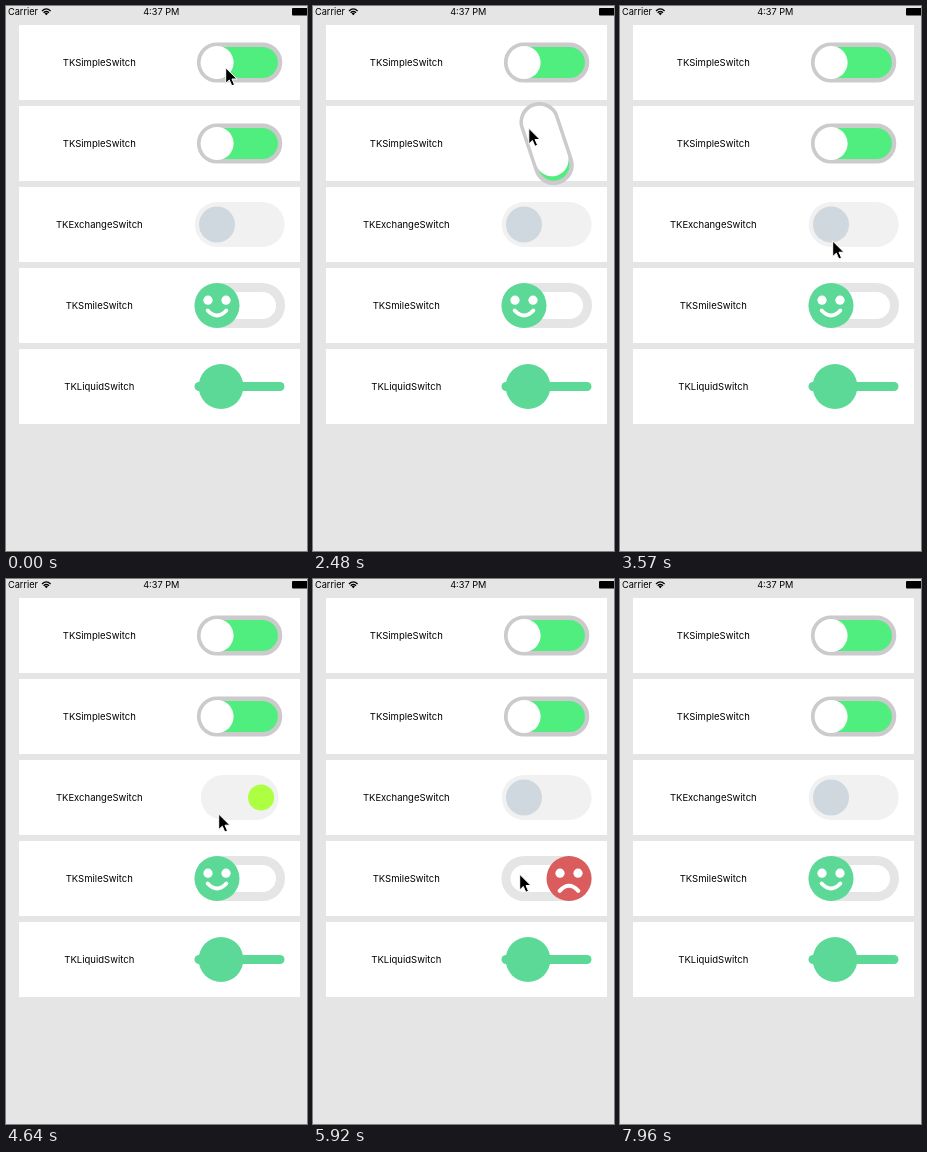
Recreate the animation shown at these times as an HTML page. Size 301x545 px, loop 8.92 s.

```html
<!DOCTYPE html>
<html lang="en">
<head>
<meta charset="utf-8">
<title>Switches</title>
<style>
  html, body { margin: 0; width: 100%; height: 100%; overflow: hidden; background: #e5e5e5; }
  svg { display: block; }
  text { font: 9.5px Inter, Roboto, sans-serif; }
  .bar { font-size: 9.2px; }
  .label { text-anchor: middle; }
</style>
</head>
<body>
<svg width="301" height="545" viewBox="0 0 301 545">
  <defs>
    <g id="frame">
      <rect x="-40.5" y="-17.8" width="81" height="35.6" rx="17.8" stroke="#cccacc" stroke-width="4.4"/>
    </g>
  </defs>

  <text class="bar" x="2" y="9.2">Carrier</text>
  <text class="bar" x="155.3" y="9.2" text-anchor="middle" font-weight="600">4:37 PM</text>
  <g fill="none" stroke="#000" stroke-width="1.3">
    <path d="M36 5Q40.3 .8 44.6 5M37.6 6.7Q40.3 4.2 43 6.7"/>
    <path d="M38.6 7.4Q40.3 6.2 42 7.4L40.3 9.2Z" fill="#000" stroke="none"/>
  </g>
  <rect x="286" y="2" width="20" height="7.5" rx="1"/>

  <g id="cells"></g>

  <g id="simple1"><use href="#frame"/><path fill="none" stroke="#fff" stroke-width="33" stroke-linecap="round"/></g>
  <g id="simple2"><use href="#frame"/><path fill="none" stroke="#fff" stroke-width="33" stroke-linecap="round"/></g>

  <rect id="pill" y="196" height="45" rx="22.5" fill="#f1f1f1"/>
  <circle id="dot" cy="218.5"/>

  <rect x="193" y="281.5" width="81.5" height="36" rx="18" fill="#fff" stroke="#e5e5e5" stroke-width="9"/>
  <g id="face">
    <circle r="22.5"/>
    <g fill="#fff">
      <ellipse class="eye" cx="-9" cy="-5.3" rx="4.6"/>
      <ellipse class="eye" cx="9" cy="-5.3" rx="4.6"/>
    </g>
    <path id="mouth" fill="none" stroke="#fff" stroke-width="4" stroke-linecap="round"/>
  </g>

  <g id="liquid">
    <rect x="188.5" y="376" width="90" height="9" rx="4.5"/>
    <ellipse id="blob" cy="380.5"/>
  </g>

  <path id="cursor" d="M0 0V15.6L3.6 12.2L6.1 18L8.8 16.8L6.3 11.2H11.2Z" stroke="#fff" stroke-width="1" stroke-linejoin="round"/>
</svg>

<script>
const LOOP = 8920;
const GREEN = [92, 217, 151], RED = [218, 92, 92], GREY = [220, 220, 220];
const $ = id => document.getElementById(id);
const set = (el, attrs) => { for (const k in attrs) el.setAttribute(k, attrs[k]); };
const clamp = u => Math.max(0, Math.min(1, u));
const span = (t, start, length) => clamp((t - start) / length);
const ease = u => u * u * (3 - 2 * u);
const lerp = (a, b, u) => a + (b - a) * u;
const mix = (a, b, u) => `rgb(${a.map((v, i) => Math.round(lerp(v, b[i], u)))})`;

// Piecewise linear value at u for evenly spaced keys
function keyed(keys, u) {
  const p = u * (keys.length - 1), i = Math.min(Math.floor(p), keys.length - 2);
  return lerp(keys[i], keys[i + 1], p - i);
}

const names = ['TKSimpleSwitch', 'TKSimpleSwitch', 'TKExchangeSwitch', 'TKSmileSwitch', 'TKLiquidSwitch'];
$('cells').innerHTML = names.map((name, i) =>
  `<rect x="13" y="${19 + 81 * i}" width="281" height="75" fill="#fff"/>
   <text class="label" x="93.3" y="${59.5 + 81 * i}">${name}</text>`).join('');

// The knob stretches across, the fill flips, then the tail catches up
function simple(id, y, t, off, on, turn) {
  const a = span(t, off, 350), b = span(t, on, 350);
  const lead = u => clamp(u / .49), lag = u => clamp((u - .51) / .49);
  const x = p => -22.5 + 45 * p;
  const angle = turn * (ease(a) + ease(b));
  const g = $(id);
  set(g, {
    transform: `translate(233.6 ${y}) rotate(${angle})`,
    fill: a >= .5 && b < .5 ? '#e5e5e5' : '#50ee7e'
  });
  set(g.lastElementChild, { d: `M${x(lag(a) - lead(b))} 0H${x(lead(a) - lag(b)) + .01}` });
}

function exchange(t) {
  const a = span(t, 3830, 350), b = span(t, 4598, 350);
  const u = b > 0 ? b : a;
  const squeeze = clamp(Math.min(u, 1 - u) / .45);
  set($('pill'), { x: 188.7 + 22.5 * squeeze, width: 90 - 45 * squeeze });
  set($('dot'), {
    cx: lerp(211, 257, ease(a) - ease(b)),
    r: 18 * (1 - squeeze),
    fill: a >= .5 && b < .5 ? '#adff41' : '#cfd8df'
  });
}

// The face rolls over, then winks
function smile(t) {
  const off = 5300, on = 5930;
  const a = span(t, off, 350), b = span(t, on, 350);
  const mood = ease(span(t, off, 250)) - ease(span(t, on, 250));
  const wink = span(t, t < on ? off + 350 : on + 350, 175);
  set($('face'), {
    transform: `translate(${lerp(211, 256, ease(a) - ease(b))} 299.5) rotate(${360 * (a - b)})`,
    fill: mix(GREEN, RED, mood)
  });
  document.querySelectorAll('.eye').forEach(eye => set(eye, { ry: 4.6 * keyed([1, .1, 1], wink) }));
  const end = lerp(5, 12.3, mood), bend = lerp(15, 2, mood);
  set($('mouth'), { d: `M-9.3 ${end}Q0 ${bend} 9.3 ${end}` });
}

function liquid(t) {
  const a = span(t, 6622, 450), b = span(t, 7335, 450);
  const u = b > 0 ? b : a;
  const tint = clamp(a * 2.9) - clamp(b * 2.9);
  set($('liquid'), { fill: mix(GREEN, GREY, tint) });
  set($('blob'), {
    cx: lerp(215, 252.5, a - b),
    rx: 22.4 * keyed([1, 1, .8, 1], u),
    ry: 22.5 * keyed([1, .8, 1, 1], u)
  });
}

// Each move: start, end, x, y
const moves = [
  [1740, 2070, 215.8, 122.3],
  [3260, 3570, 212.7, 235],
  [4850, 5100, 206.7, 295.3],
  [6260, 6560, 209.7, 385.3],
  [7680, 7960, 274, 562]
];

function cursor(t) {
  let x = 219.7, y = 61.8;
  for (const [start, end, toX, toY] of moves) {
    const u = ease(span(t, start, end - start));
    x = lerp(x, toX, u);
    y = lerp(y, toY, u);
  }
  set($('cursor'), { transform: `translate(${x} ${y})` });
}

const begin = performance.now();
function draw() {
  const t = (performance.now() - begin) % LOOP;
  simple('simple1', 56.5, t, 930, 1440, 0);
  simple('simple2', 137.5, t, 2330, 2970, 180);
  exchange(t);
  smile(t);
  liquid(t);
  cursor(t);
  requestAnimationFrame(draw);
}
draw();
</script>
</body>
</html>
```
